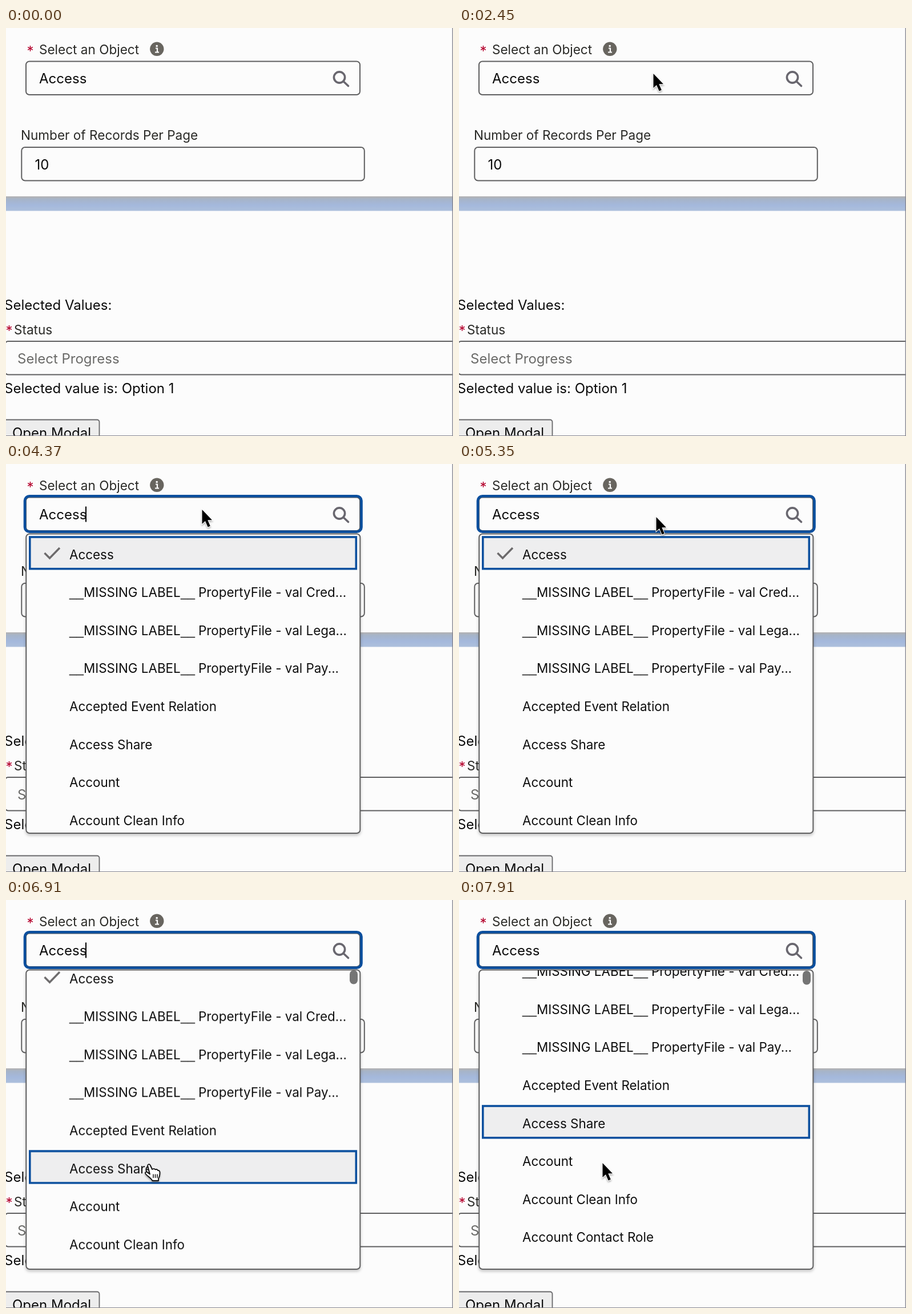
Animation of 783x715 px, one loop 8000 ms. Source, as an HTML page:

```html
<!DOCTYPE html>
<html lang="en">
<head>
<meta charset="utf-8">
<title>Object picker</title>
<style>
html, body { margin: 0; width: 100%; height: 100%; overflow: hidden; background: #fcfcfc; }
svg { display: block; }
text { font: 24px Inter, "Open Sans", sans-serif; fill: #0a0a0a; white-space: pre; }
.label { font-size: 22.55px; fill: #2a2a27; }
.star { font-size: 24px; fill: #b4002c; }
.hint { fill: #6a6a68; }
.box { fill: #fcfcfc; stroke: #5f5f60; stroke-width: 2; }
.list text { font-size: 22.4px; fill: #0e0e0e; }
.list .line { font-family: "Liberation Sans", Arial, sans-serif; }
.focus, .caret, .menu, .thumb, .mark, .arrow, .hand { animation: 8s step-end infinite; }
.focus { animation-name: focus; }
.caret { animation-name: blink; }
.menu { animation-name: open; }
.thumb { animation-name: thumb; }
.mark { animation-name: hover; }
.arrow { animation-name: arrow; }
.hand { animation-name: hand; }
.list { animation: scroll 8s linear infinite; }
.pointer { animation: move 8s ease-in-out infinite; }

@keyframes focus { 0% { opacity: 0 } 39.4%, 100% { opacity: 1 } }
@keyframes open { 0% { opacity: 0 } 53.8%, 100% { opacity: 1 } }
@keyframes thumb { 0% { opacity: 0 } 84.5% { opacity: 1 } 93%, 100% { opacity: 1; transform: translateY(1px) } }
@keyframes blink {
  0%, 46.9%, 61.9%, 76.9%, 91.9%, 100% { opacity: 0 }
  39.4%, 54.4%, 69.4%, 84.4% { opacity: 1 }
}
@keyframes arrow { 0% { opacity: 1 } 75.7% { opacity: 0 } 97%, 100% { opacity: 1 } }
@keyframes hand { 0% { opacity: 0 } 75.7% { opacity: 1 } 97%, 100% { opacity: 0 } }
@keyframes hover {
  0% { transform: none }
  77.2% { transform: translateY(66.6px) }
  78.2% { transform: translateY(133.2px) }
  79.2% { transform: translateY(199.8px) }
  80.4% { transform: translateY(266.4px) }
  82.4%, 100% { transform: translateY(333px) }
}
@keyframes scroll {
  0%, 84.6% { transform: none }
  86.4% { transform: translateY(-21px) }
  89.6% { transform: translateY(-81px) }
  92% { transform: translateY(-94px) }
  95% { transform: translateY(-99px) }
  98%, 100% { transform: translateY(-100px) }
}
@keyframes move {
  0%, 4% { transform: translate(790px, 630px) }
  9.1%, 11.1% { transform: translate(708px, 655px); animation-timing-function: ease-in }
  14% { transform: translate(480px, 540px); animation-timing-function: linear }
  17% { transform: translate(128px, 400px); animation-timing-function: ease-out }
  19.9%, 21.4% { transform: translate(190px, 209px) }
  26% { transform: translate(384px, 112px) }
  30.6% { transform: translate(340px, 80px) }
  45.9%, 55% { transform: translate(343px, 80px) }
  66%, 73.9% { transform: translate(345px, 93px) }
  83%, 100% { transform: translate(251px, 461px) }
}
</style>
</head>
<body>
<svg width="783" height="715" viewBox="0 0 783 715">
  <defs>
    <linearGradient id="band" x2="0" y2="1">
      <stop offset="0" stop-color="#b3b2b2"/>
      <stop offset=".2" stop-color="#a6b4c9"/>
      <stop offset=".6" stop-color="#a4b8dc"/>
      <stop offset="1" stop-color="#adc0dc"/>
    </linearGradient>
    <clipPath id="view"><rect x="36" y="123" width="583" height="523" rx="5"/></clipPath>
    <filter id="shade" x="-5%" y="-5%" width="110%" height="112%">
      <feDropShadow dx="0" dy="3" stdDeviation="2.5" flood-opacity=".22"/>
    </filter>
    <filter id="lift" x="-40%" y="-30%" width="180%" height="180%">
      <feDropShadow dx="0" dy="2" stdDeviation="1.5" flood-opacity=".35"/>
    </filter>
  </defs>

  <rect width="783" height="715" fill="#fcfcfc"/>
  <rect y="295" width="783" height="25.5" fill="url(#band)"/>

  <text class="star" x="36.5" y="48.5">*</text>
  <text class="label" x="58" y="45.5">Select an Object</text>
  <circle cx="264.3" cy="36.8" r="12.2" fill="#68655f"/>
  <path d="M262 35.5h3v7M261 42.5h7" fill="none" stroke="#fff" stroke-width="2.2"/>
  <circle cx="264.2" cy="31.5" r="1.8" fill="#fff"/>

  <rect class="box" x="35" y="58.5" width="585" height="58.5" rx="6"/>
  <rect class="focus" x="33" y="56.3" width="589.5" height="62.5" rx="8" fill="none" stroke="#0b4f9e" stroke-width="4.6"/>
  <text x="58" y="97">Access</text>
  <rect class="caret" x="139" y="74.5" width="2" height="27"/>
  <g fill="none" stroke="#69676f" stroke-width="3.6" stroke-linecap="round">
    <circle cx="584" cy="86.5" r="9.6"/>
    <path d="M591.5 94l8 7.5"/>
  </g>

  <text class="label" x="26" y="196">Number of Records Per Page</text>
  <rect class="box" x="27.3" y="209" width="600.5" height="58.5" rx="6"/>
  <text x="50.5" y="247.5">10</text>

  <text x="-3" y="494">Selected Values:</text>
  <text class="star" x="-.5" y="539">*</text>
  <text class="label" x="14" y="536.5">Status</text>
  <rect class="box" x="-2" y="549" width="800" height="58.5" rx="6"/>
  <text class="hint" x="20" y="588">Select Progress</text>
  <text x="-3" y="640">Selected value is: Option 1</text>
  <rect x="-5" y="686.5" width="168.5" height="50" rx="4" fill="#ededed" stroke="#68686a" stroke-width="1.8"/>
  <text x="11" y="718">Open Modal</text>
  <path d="M782.3 0V715M0 714.6H783" stroke="#85858f" stroke-width="1.3"/>

  <g class="menu">
    <rect class="box" x="35.3" y="122.5" width="585" height="524.5" rx="6" filter="url(#shade)"/>
    <g clip-path="url(#view)">
      <g class="list">
        <rect class="mark" x="41.8" y="128" width="571.5" height="55.7" fill="#eeeeef" stroke="#0b4f9e" stroke-width="3.6"/>
        <path d="M67.500 156l9 9 17.500-18" fill="none" stroke="#6c6a6b" stroke-width="3.4"/>
        <g id="rows"></g>
      </g>
      <rect class="thumb" x="602" y="123" width="14" height="24.5" rx="7" fill="#757575"/>
    </g>
  </g>

  <g class="pointer">
    <path class="arrow" filter="url(#lift)" d="M.5 0V25L6 20l4.6 10.5 4.2-1.8L10.3 18.3H18z" stroke="#fff" stroke-width="1.8" paint-order="stroke"/>
    <g class="hand" filter="url(#lift)">
      <g transform="translate(-9)" stroke="#111" stroke-width="1.8" stroke-linejoin="round">
        <path fill="#fff" d="M6.5 6C5 2 9.5.5 11 4.5L14 11c2-1.5 4.5-1 5.5.5 2-1 4-.5 4.5 1.5 2.5-.5 3.5 1.5 3.5 3.5 0 4.5-.5 7.5-2.5 10.5v4H14.5C13 27 6 23 3 19.5 0 16 4 14.5 6.5 17l3.5 2.5z"/>
        <path fill="none" stroke-width="1.5" d="M16 19.5v6.500M19.5 19.5v6.500M23 19.5v6.500"/>
      </g>
    </g>
  </g>
</svg>
<script>
const rows = document.getElementById('rows');
const pitch = 66.6, firstBaseline = 166.5;

function addText(x, row, content, className = '') {
  const node = document.createElementNS('http://www.w3.org/2000/svg', 'text');
  node.setAttribute('x', x);
  node.setAttribute('y', firstBaseline + row * pitch);
  node.setAttribute('class', className);
  node.textContent = content;
  rows.append(node);
}

['Cred', 'Lega', 'Pay'].forEach((name, i) => {
  addText(111, i + 1, '__', 'line');
  addText(136, i + 1, 'MISSING LABEL');
  addText(306, i + 1, '__', 'line');
  addText(337, i + 1, `PropertyFile - val ${name}...`);
});

addText(111, 0, 'Access');
['Accepted Event Relation', 'Access Share', 'Account', 'Account Clean Info', 'Account Contact Role']
  .forEach((name, i) => addText(111, i + 4, name));
</script>
</body>
</html>
```
